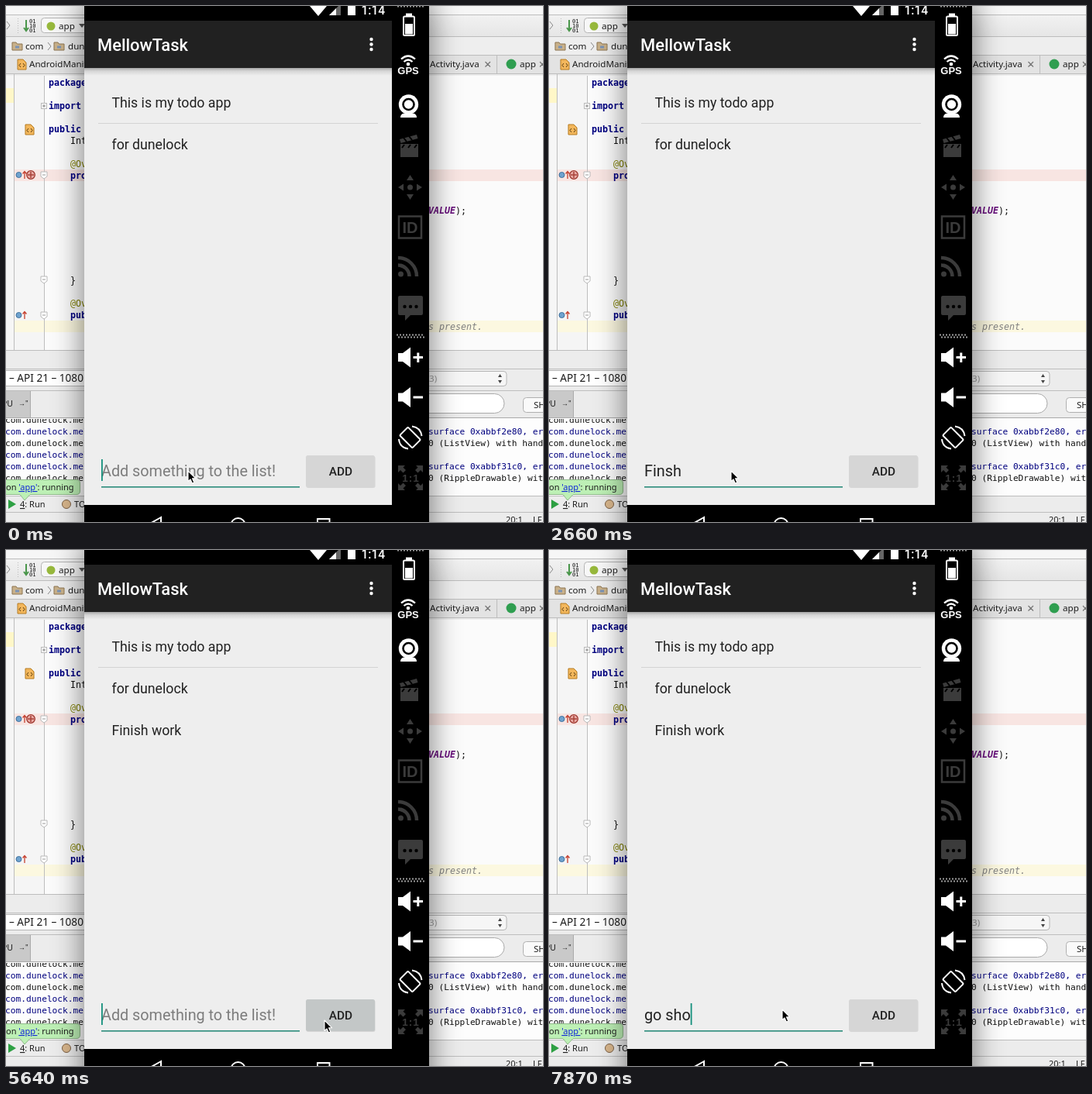
Recreate the animation shown at these times as an HTML page. Size 693 by 666 pixels, loop 8000 ms.

```html
<!DOCTYPE html>
<html lang="en">
<head>
<meta charset="utf-8">
<title>Todo list demo</title>
<style>
  html, body { margin: 0; width: 100%; height: 100%; overflow: hidden; background: #fff; }
  svg { display: block; }
  text { white-space: pre; }
  .ui { font: 11.6px "Noto Sans", sans-serif; fill: #1c1c1c; }
  .code { font: 11.63px "DejaVu Sans Mono", monospace; fill: #111; }
  .log { font-size: 11.2px; }
  .kw { font-weight: bold; fill: #000080; }
  .note { fill: #808000; }
  .app { font-family: Roboto, sans-serif; fill: #212121; }
  .item { font-size: 17.7px; }
  .entry { font-size: 19.8px; }
  .bold { font-family: "Liberation Sans", Arial, sans-serif; font-weight: bold; }
</style>
</head>
<body>
<svg width="693" height="666" viewBox="0 0 693 666">
  <defs>
    <filter id="blur" x="-30%" y="-30%" width="160%" height="160%"><feGaussianBlur stdDeviation="20"/></filter>
    <linearGradient id="drop" x2="0" y2="1">
      <stop offset="0" stop-color="#000" stop-opacity=".3"/>
      <stop offset=".4" stop-color="#000" stop-opacity=".1"/>
      <stop offset="1" stop-color="#000" stop-opacity="0"/>
    </linearGradient>
    <linearGradient id="bar" x2="0" y2="1">
      <stop offset="0" stop-color="#f2f2f2"/><stop offset="1" stop-color="#e6e6e6"/>
    </linearGradient>
    <clipPath id="logClip"><rect y="533" width="693" height="99"/></clipPath>
    <g id="fold"><path d="M-4-4H4V2L0 5L-4 2Z" fill="#fff" stroke="#b8b8b8"/><path d="M-2 0H2" stroke="#999"/></g>
    <g id="over"><circle cx="16.500" cy="0" r="3.500" fill="#6fa3cf" stroke="#3d6f9c"/><path d="M24 5V-4M21.500-1.500L24-4.500L26.500-1.500" fill="none" stroke="#c5402f" stroke-width="1.300"/></g>
    <g id="doc"><path d="M-5-6H2L6-2V7H-5Z" fill="#f3b75c" stroke="#b47a20"/><path d="M-1-1L-3 1.500L-1 4M2-1L4 1.500L2 4" fill="none" stroke="#5a3c10"/></g>
    <g id="folder"><path d="M0 0H5L6.500 2H13V10H0Z" fill="#c9b18a" stroke="#8c7550"/><path d="M4 6H9" stroke="#7b93b5" stroke-width="3"/></g>
  </defs>

  <!-- editor window -->
  <rect width="693" height="666" fill="#ececec"/>
  <rect width="693" height="11" fill="#f6f6f6"/>
  <rect y="11" width="693" height="28" fill="url(#bar)"/>
  <rect y="40" width="693" height="23" fill="#eeeeee"/>
  <rect y="63" width="693" height="24" fill="#e3e3e3"/>
  <rect y="90" width="693" height="354" fill="#fbfbfb"/>
  <rect y="90" width="10" height="354" fill="#f6f6f6"/>
  <rect y="106" width="10" height="19" fill="#fff7c8"/>
  <rect x="11" y="90" width="38" height="354" fill="#f5f5f5"/>
  <rect x="11" y="211" width="682" height="15" fill="#f8e5e2"/>
  <rect x="11" y="406" width="682" height="15" fill="#fcf8e0"/>
  <path d="M0 11.500H693M0 39.500H693M0 63.500H693M0 87.500H693M10.500 88V444M49.500 90V444M0 444.500H693M0 468.500H693M0 496.500H693M0 653.500H693M633.500 64V87" fill="none" stroke="#bdbdbd"/>
  <path d="M1 20L5 25L1 30M54 47L58 52L54 57" fill="none" stroke="#888"/>
  <path d="M15.500 16V35" stroke="#bbb" stroke-dasharray="1 2"/>
  <path d="M26 18V31M23 28L26 32L29 28" fill="none" stroke="#49964a" stroke-width="2"/>
  <g class="code" style="font-size:7px"><text x="30" y="22">01</text><text x="30" y="28">10</text><text x="30" y="34">01</text></g>
  <rect x="45.500" y="15.500" width="70" height="19" rx="4" fill="#f7f7f7" stroke="#b5b5b5"/>
  <circle cx="58" cy="26" r="5.500" fill="#97b83c"/>
  <path d="M94 23H102L98 28Z" fill="#555"/>
  <use href="#folder" x="8" y="47"/><use href="#folder" x="62" y="47"/>
  <use href="#doc" x="20" y="75"/><use href="#doc" x="30" y="159"/>
  <circle cx="652" cy="75" r="6.500" fill="#2f9e50"/>
  <g class="ui">
    <text x="68" y="30">app</text><text x="25" y="56">com</text><text x="80" y="56">dunelock</text>
    <text x="30" y="79">AndroidManifest.xml</text>
    <text x="547" y="79">Activity.java</text><text x="663" y="79">app</text>
  </g>
  <path d="M618.500 72L625 78.500M625 72L618.500 78.500M689 72L695 78.500M695 72L689 78.500" stroke="#777" stroke-width="1.300"/>
  <rect x="45.500" y="125.500" width="7" height="7" fill="#fff" stroke="#b8b8b8"/><path d="M47 129H51M49 127V131" stroke="#888"/>
  <use href="#fold" x="49" y="218"/><use href="#fold" x="49" y="353"/><use href="#fold" x="49" y="399"/>
  <use href="#over" y="218"/><use href="#over" y="399"/>
  <circle cx="32" cy="218" r="5.300" fill="#e9aaa4" stroke="#9c342c" stroke-width="1.300"/><path d="M28 218H36M32 214V222" stroke="#a8433a" stroke-width="1.500"/>
  <g class="code">
    <text x="55" y="103" class="kw">package</text><text x="55" y="133" class="kw">import</text><text x="55" y="163" class="kw">public</text>
    <text x="83" y="178">Inte</text><text x="83" y="208" class="note">@Over</text><text x="83" y="223" class="kw">prot</text>
    <text x="83" y="358">}</text><text x="83" y="388" class="note">@Over</text><text x="83" y="403" class="kw">publ</text>
    <text x="545" y="268"><tspan fill="#660e7a" font-weight="bold" font-style="italic">VALUE</tspan>);</text>
    <text x="545" y="418" style="fill:#808080;font-style:italic">s present.</text>
  </g>

  <!-- device panel and log -->
  <rect x="-20" y="470.500" width="160" height="20" fill="#fff" stroke="#b5b5b5"/>
  <rect x="520" y="471.500" width="126" height="19" rx="4" fill="#f6f6f6" stroke="#b5b5b5"/>
  <path d="M635 479L637.500 475L640 479ZM635 483L637.500 487L640 483Z" fill="#444"/>
  <rect y="497" width="31" height="34" fill="#c9c9c9"/><path d="M31.500 497V531M0 531.500H693" stroke="#aaa"/>
  <rect x="500" y="500.500" width="143" height="25" rx="12.500" fill="#fff" stroke="#a9a9a9"/>
  <rect x="667.500" y="505.500" width="60" height="19" rx="4" fill="#fafafa" stroke="#b0b0b0"/>
  <rect y="532" width="693" height="100" fill="#fdfdfd"/>
  <g class="code log" id="log" clip-path="url(#logClip)"></g>
  <path d="M0 632.500H693" stroke="#bdbdbd"/>
  <path d="M-5 611.500H91Q95.500 611.500 95.500 616V626Q95.500 630.500 91 630.500H31L24 638L18 630.500H-5Z" fill="#bdf0b5" stroke="#8fb98a"/>
  <path d="M3 637L13 643L3 649Z" fill="#2ea043"/>
  <circle cx="78" cy="643" r="5.500" fill="#d9b78d" stroke="#7d6247"/>
  <g class="ui">
    <text x="4" y="485" style="font-size:13.600px">– API 21 – 1080</text>
    <text x="546" y="485" style="fill:#999">3)</text>
    <text x="-5" y="517" style="font-size:10.500px">PU</text><text x="16" y="516" style="font-size:9px">→"</text>
    <text x="681" y="519">SH</text>
    <text x="0" y="625" style="font-size:11px">on <tspan fill="#1026d8" text-decoration="underline">'app'</tspan>: running</text>
    <text x="18" y="647" style="font-size:11px"><tspan text-decoration="underline">4</tspan>: Run</text><text x="88" y="647" style="font-size:11px">TODO</text>
    <text x="645" y="667" style="font-size:11px">20:1</text><text x="680" y="667" style="font-size:11px">LF</text>
  </g>

  <!-- phone -->
  <rect x="101" y="-10" width="445" height="770" opacity=".54" filter="url(#blur)"/>
  <rect x="101" width="445" height="666" fill="#000"/>
  <rect x="101" y="80" width="397" height="564" fill="#eeeeee"/>
  <rect x="101" y="80" width="397" height="10" fill="url(#drop)"/>
  <rect x="101" y="19" width="397" height="61" fill="#212121"/>
  <path d="M392 0H414L403 13Z" fill="#fff"/>
  <path d="M417 12L432 -3V12Z" fill="#666"/><path d="M417 12L426 3V12Z" fill="#fff"/>
  <path d="M441 0H451V12H441Z" fill="#fff"/>
  <g class="app">
    <text x="458.500" y="11" style="font-size:15.600px;font-weight:500;fill:#fff">1:14</text>
    <text x="118" y="58" style="font-size:21.900px;font-weight:500;fill:#fff">MellowTask</text>
    <text x="136.500" y="131" class="item">This is my todo app</text>
    <text x="136.500" y="185" class="item">for dunelock</text>
    <text x="136.500" y="238.500" class="item" id="added">Finish work</text>
  </g>
  <g fill="#fff"><circle cx="471.500" cy="43" r="2.200"/><circle cx="471.500" cy="49.500" r="2.200"/><circle cx="471.500" cy="56" r="2.200"/></g>
  <path d="M119 151.500H480" stroke="#d3d3d3"/>
  <rect x="123" y="620" width="256" height="1.600" fill="#2b8c7b"/>
  <text id="entry" class="app entry" x="123" y="607"></text>
  <rect id="caret" y="585" width="1.800" height="28" fill="#14907c"/>
  <rect x="387.500" y="581" width="89" height="41" rx="2.500" fill="#000" opacity=".1"/>
  <rect id="button" x="387" y="580" width="89" height="41" rx="2.500"/>
  <text class="app" x="432" y="606" text-anchor="middle" style="font-size:15.400px;font-weight:500">ADD</text>
  <g fill="none" stroke="#fff" stroke-width="2"><path d="M200 660L184 669L200 678Z"/><circle cx="299.500" cy="670" r="9"/><rect x="402" y="662" width="15.500" height="15"/></g>

  <!-- emulator tools -->
  <path d="M505 .5H539M504 424.500H540M506 427.500H541" stroke="#999" stroke-width="2" stroke-dasharray="2 2"/>
  <g fill="#fff">
    <rect x="516" y="9.500" width="8" height="4"/>
    <rect x="513" y="13.500" width="14" height="24.500" rx="1.500" fill="none" stroke="#fff" stroke-width="2"/>
    <rect x="515" y="23" width="10" height="13.500"/>
    <circle cx="519" cy="75" r="2.300"/>
    <path d="M513.500 72Q519 67 524.500 72M510 68.500Q519 60.500 528 68.500" fill="none" stroke="#fff" stroke-width="2.300"/>
    <text x="519" y="87.500" text-anchor="middle" class="bold" font-size="13">GPS</text>
    <circle cx="519.500" cy="127" r="12.700"/><circle cx="519.500" cy="127" r="7" fill="none" stroke="#000" stroke-width="2.600"/>
    <path d="M509 144Q509 139 514 138.500H525Q530 139 530 144Z"/>
    <g id="up"><path d="M506 448H512L522 440.500V466.500L512 459H506Z"/><path d="M525.500 453.500H538" stroke="#fff" stroke-width="3"/></g>
    <path d="M531.800 447.500V460" stroke="#fff" stroke-width="3"/>
    <use href="#up" y="51.500"/>
  </g>
  <g fill="none" stroke="#fff" stroke-width="2">
    <rect x="-7.500" y="-11.500" width="15" height="23" rx="1.500" transform="translate(521.500 557) rotate(-45)"/>
    <path d="M524 542.500Q535 544 536.500 555M507 559Q508 570 519 571.500"/>
  </g>
  <g fill="#3b3b3b">
    <path d="M509 178H532V195H509ZM508 172L530 166L531.500 171L509.500 177Z"/>
    <path d="M513 170L517 175M520 168L524 173M514 179L511 183M522 179L519 183M530 179L527 183" stroke="#000" stroke-width="2"/>
    <circle cx="521.500" cy="234" r="3.500"/>
    <path d="M517 225L521.500 218L526 225ZM517 243L521.500 250L526 243ZM513 229.500L506 234L513 238.500ZM530 229.500L537 234L530 238.500Z"/>
    <rect x="507" y="271.500" width="29" height="28" fill="none" stroke="#3b3b3b" stroke-width="2.500"/>
    <text x="521.500" y="293" text-anchor="middle" class="bold" font-size="20">ID</text>
    <circle cx="509.500" cy="346" r="3.500"/>
    <path d="M506 334.500A14.500 14.500 0 0 1 520.500 349M506 325A24 24 0 0 1 530 349" fill="none" stroke="#3b3b3b" stroke-width="4.500"/>
    <path d="M508 374H536Q538 374 538 376V397Q538 399 536 399H522L515 406V399H508Q506 399 506 397V376Q506 374 508 374Z"/>
    <g fill="#000"><circle cx="514.500" cy="388" r="2.200"/><circle cx="522" cy="388" r="2.200"/><circle cx="529.500" cy="388" r="2.200"/></g>
    <g id="corners"><path id="corner" d="M506 593H515L512.500 595.500L516 599L512.500 602.500L509 599L506 602Z"/><use href="#corner" transform="matrix(-1 0 0 1 1044 0)"/></g>
    <use href="#corners" transform="matrix(1 0 0 -1 0 1218)"/>
    <text x="522.500" y="614" text-anchor="middle" class="bold" font-size="13.500" letter-spacing="1">1:1</text>
  </g>

  <path id="mouse" d="M0 0V13.500L3 10.800L5.300 16L7.800 15L5.500 9.800H9.700Z" fill="#000" stroke="#fff" stroke-width="1.100" stroke-linejoin="round"/>
</svg>
<script>
const $ = id => document.getElementById(id);
const LOOP = 8000, LEFT = 123;
const HINT = "Add something to the list!";

// [time, typed text, caret visible]
const typing = [
  [0, "", 1], [300, "", 0], [740, "", 1], [1330, "F", 1],
  [1780, "Fi", 1], [1930, "Fin", 1], [2070, "Finsh", 1],
  [2660, "Finsh", 0], [2810, "Fins", 1], [2960, "Fin", 1],
  [3250, "Fini", 1], [3400, "Finish", 1], [3550, "Finish ", 1],
  [4150, "Finish ", 0], [4600, "Finish wo", 1], [4740, "Finish work", 1],
  [5490, "", 1], [6090, "", 0], [6540, "", 1],
  [6980, "g", 1], [7130, "go", 1], [7420, "go ", 1],
  [7570, "go s", 1], [7720, "go sh", 1], [7870, "go sho", 1]
];
// [time, x, y]
const moves = [
  [0, 235, 600], [5040, 395, 597], [5190, 411, 607],
  [5790, 352, 602], [5940, 304, 595], [6090, 301, 593]
];
// [time, button colour]
const press = [
  [0, "#d6d6d6"], [5340, "#cacccc"], [5490, "#c3c7c7"],
  [5790, "#cccece"], [5940, "#d6d6d6"]
];

const at = (steps, t) => steps.findLast(s => s[0] <= t);

function logLine(x, y, text, color) {
  const line = document.createElementNS("http://www.w3.org/2000/svg", "text");
  line.setAttribute("x", x);
  line.setAttribute("y", y);
  line.style.fill = color;
  line.textContent = text;
  $("log").append(line);
}

const INK = "#111", NAVY = "#00007f";
[INK, NAVY, INK, NAVY, NAVY, INK].forEach((c, i) =>
  logLine(-1, 538 + 15 * i, "com.dunelock.mel", c));
logLine(545, 553, "surface 0xabbf2e80, error", NAVY);
logLine(545, 568, "0 (ListView) with handle", INK);
logLine(545, 598, "surface 0xabbf31c0, error", NAVY);
logLine(545, 613, "0 (RippleDrawable) with", INK);

function draw(t) {
  const [, text, caret] = at(typing, t);
  const [, x, y] = at(moves, t);
  const entry = $("entry");
  entry.textContent = text || HINT;
  entry.style.fill = text ? "#212121" : "#7d7d7d";
  const end = text ? entry.getComputedTextLength() : 0;
  $("caret").setAttribute("x", LEFT + end);
  $("caret").setAttribute("opacity", caret);
  $("added").setAttribute("opacity", t >= 5490 ? 1 : 0);
  $("button").setAttribute("fill", at(press, t)[1]);
  $("mouse").setAttribute("transform", `translate(${x} ${y})`);
}

const start = performance.now();
function tick() {
  draw((performance.now() - start) % LOOP);
  requestAnimationFrame(tick);
}
tick();
</script>
</body>
</html>
```
